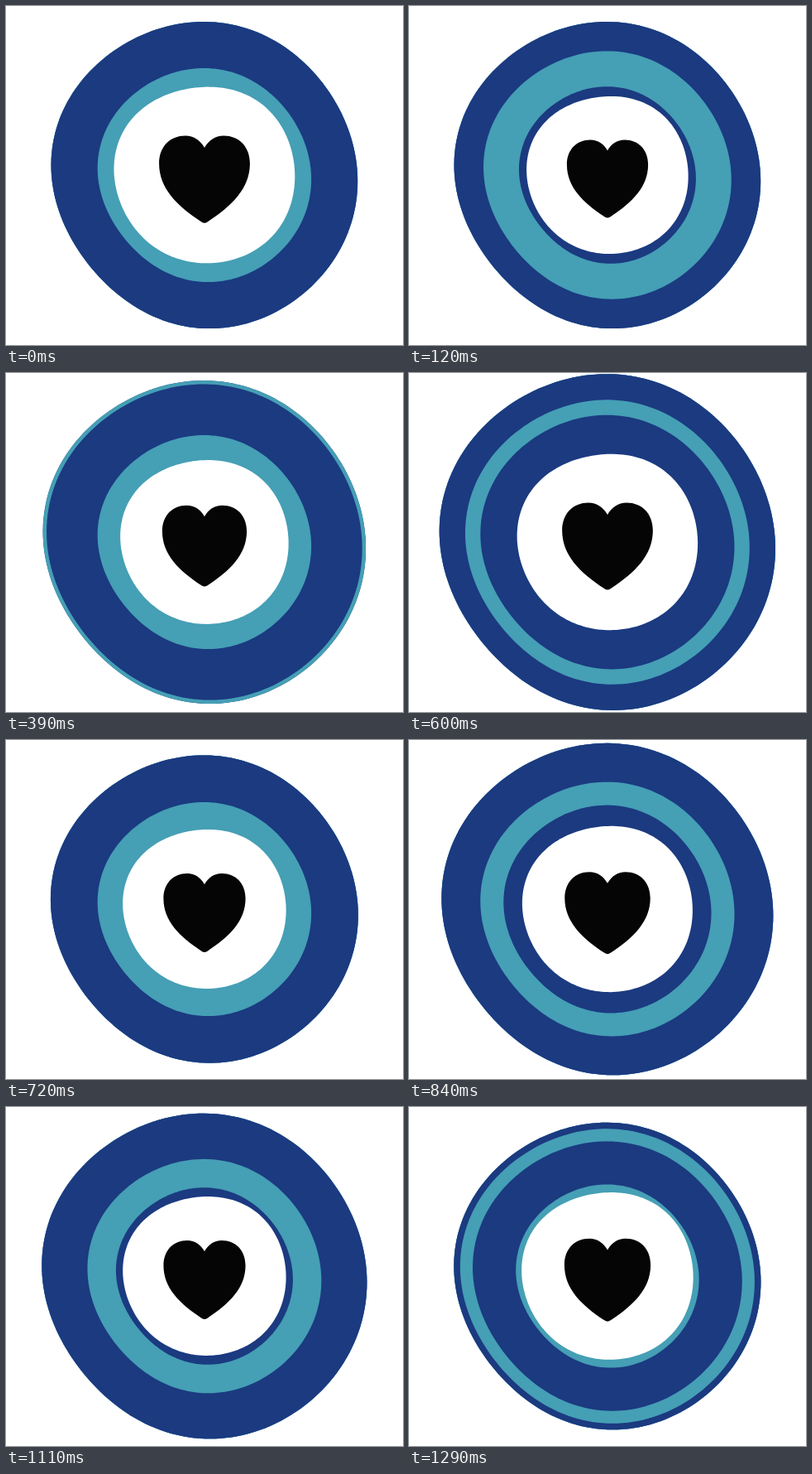
Recreate the animation shown at these times as an HTML page. Size 480 by 409 pixels, loop 1320 ms.

```html
<!DOCTYPE html>
<html lang="en">
<head>
<meta charset="utf-8">
<title>Beating heart</title>
<style>
  html, body { margin: 0; width: 100%; height: 100%; overflow: hidden; background: #fff; }
  svg { display: block; width: 480px; height: 409px; }
</style>
</head>
<body>
<svg viewBox="0 0 480 409">
  <defs>
    <clipPath id="edge"><path id="rim"/></clipPath>
  </defs>
  <g clip-path="url(#edge)">
    <rect width="480" height="409" fill="#1b3a80"/>
    <g id="rings"></g>
  </g>
  <g id="core">
    <path id="white" fill="#fff"/>
    <path fill="#050505" d="M0-33C5-42 13-47.5 23-47.5C42-47.5 54.8-34 54.8-14C54.8 16 33 37 4 56Q0 59-4 56C-33 37-54.8 16-54.8-14C-54.8-34-42-47.5-23-47.5C-13-47.5-5-42 0-33Z"/>
  </g>
</svg>
<script>
const STEP = 30, FRAMES = 44, FIRST = 13, NEXT = 11;
const TEAL = '#459fb5', BLUE = '#1b3a80';
const CORE = 218;
const { PI, cos, sin, abs } = Math;
const $ = id => document.getElementById(id);

// Uneven circle: a sum of a few waves around the rim
function round(width, { flat, tilt, skew, swirl, square }) {
  const points = [];
  for (let i = 0; i < 180; i++) {
    const a = i * PI / 90;
    const r = width / 2 * (1
      - flat * (1 - cos(2 * a))
      + tilt * sin(2 * a)
      + skew * (cos(a + PI / 4) + cos(3 * (a + PI / 4)))
      + swirl * sin(4 * a)
      - square * (1 - cos(4 * a)));
    points.push(`${(r * cos(a)).toFixed(3)} ${(r * sin(a)).toFixed(3)}`);
  }
  return `M${points.join('L')}Z`;
}

const place = (el, width, base = 1) =>
  el.setAttribute('transform', `translate(240 204) scale(${Math.max(0, width / base)})`);

const blob = round(1, { flat: 0, tilt: 0.02, skew: 0.0057, swirl: 0.0046, square: 0.006 });
// Unit paths need more digits, so build them large and scale down
const BLOB = 400;
const blobPath = round(BLOB, { flat: 0, tilt: 0.02, skew: 0.0057, swirl: 0.0046, square: 0.006 });

$('rim').setAttribute('d', blobPath);
$('white').setAttribute('d',
  round(CORE, { flat: 0.0135, tilt: 0.009, skew: 0.01, swirl: 0.006, square: -0.006 }));
const discs = [TEAL, BLUE, TEAL, BLUE, TEAL].map(fill => {
  const el = document.createElementNS('http://www.w3.org/2000/svg', 'path');
  el.setAttribute('d', blobPath);
  el.setAttribute('fill', fill);
  return $('rings').appendChild(el);
});

// The rim rests first, then pulses with a fading lift
function rimWidth(f) {
  if (f < 5.8) return 370;
  const lift = 38 - 14 * (f / 38) ** 3;
  return 370 + lift * abs(cos(PI * (f - 10.4) / 9.25)) ** 1.4;
}

function draw(f) {
  const len = f < FIRST ? FIRST : NEXT;
  const passed = f < FIRST ? f : (f - FIRST) % NEXT;
  const left = len - passed;
  const grow = 134 * passed / len;
  const widths = [
    392 + grow, 381 + 18.6 * passed,
    258 + grow, 381 - 18.6 * left,
    258 - 12.3 * left
  ];
  widths.forEach((w, i) => place(discs[i], w, BLOB));
  place($('rim'), rimWidth(f), BLOB);
  place($('core'), 205.5 + 13 * cos(2 * PI * f / 10.17), CORE);
}

const start = performance.now();
function tick(now) {
  draw(Math.floor(Math.max(0, now - start) / STEP) % FRAMES);
  requestAnimationFrame(tick);
}
draw(0);
requestAnimationFrame(tick);
</script>
</body>
</html>
```
